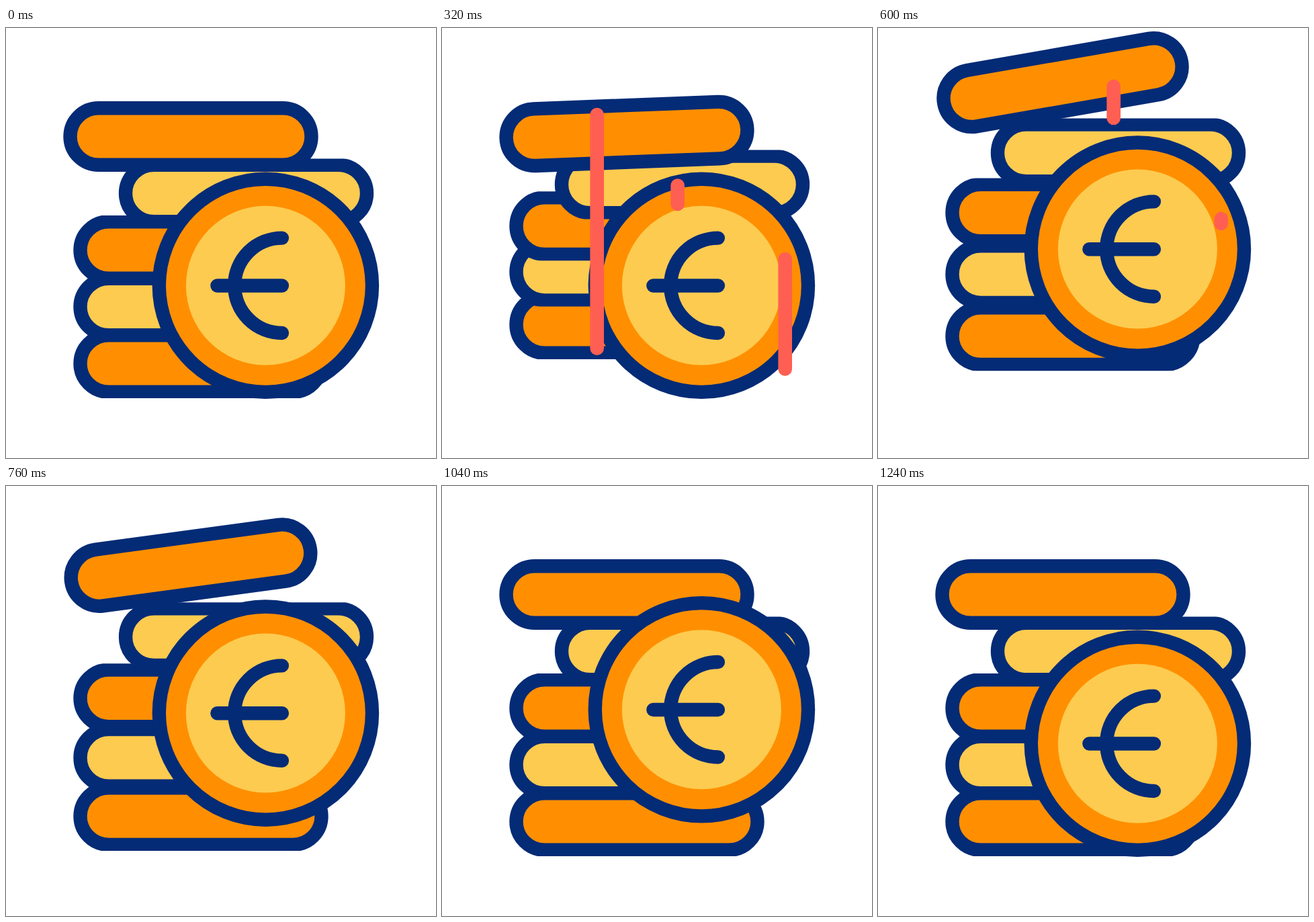
An HTML page that plays this animation: 640 by 640 pixels, repeating every 2 s.

```html
<!DOCTYPE html>
<html lang="en">
<head>
<meta charset="utf-8">
<title>Coin stack</title>
<style>
  html, body { margin: 0; width: 100%; height: 100%; overflow: hidden; background: #fff; }
  svg { display: block; width: 100vw; height: 100vh; }
  .line { fill: none; stroke: #042b76; stroke-width: 20.4; stroke-linecap: round; }
  .orange { fill: #ff8f00; }
  .yellow { fill: #fdcb50; }
  .streak { stroke: #ff5f52; stroke-width: 20.6; stroke-linecap: round; }
</style>
</head>
<body>
<svg viewBox="0 0 640 640">
  <defs>
    <clipPath id="trim"><rect x="-200" y="-51.5" width="400" height="103"/></clipPath>
  </defs>
  <g id="bars"></g>
  <g id="coin">
    <circle class="orange" r="158.6"/>
    <circle class="line" r="158.6"/>
    <circle class="yellow" r="118.5"/>
    <path class="line" d="M24.5-70.7A70.7 70.7 0 0 0 24.5 70.7M-72 .2H24.5"/>
  </g>
  <g id="streaks"></g>
</svg>
<script>
const LOOP = 2000, STEP = 40;
const $ = id => document.getElementById(id);

function add(parent, tag, attrs) {
  const el = document.createElementNS('http://www.w3.org/2000/svg', tag);
  for (const k in attrs) el.setAttribute(k, attrs[k]);
  return parent.appendChild(el);
}

// Cubic easing with handles (a, 0) and (b, 1)
function ease(a, b) {
  return x => {
    if (x <= 0) return 0;
    if (x >= 1) return 1;
    let lo = 0, hi = 1, s;
    for (let i = 0; i < 24; i++) {
      s = (lo + hi) / 2;
      const q = 1 - s;
      if (3 * q * q * s * a + 3 * q * s * s * b + s * s * s < x) lo = s; else hi = s;
    }
    return s * s * (3 - 2 * s);
  };
}
const rise = ease(.6, .31);
const fall = ease(.48, .56);
const linear = x => Math.min(1, Math.max(0, x));
const part = (t, from, to, fn) => fn((t - from) / (to - from));

// 0 -> 1 -> 0
const hop = (t, from, peak, to, up = rise, down = fall) =>
  part(t, from, peak, up) - part(t, peak, to, down);

// Bottom bar first, so that upper bars overlap lower ones
const bars = [
  { x: 290, y: 499.5, lift: 60.2, fill: 'orange' },
  { x: 290, y: 415, lift: 60.5, fill: 'yellow' },
  { x: 290, y: 330.5, lift: 60.5, fill: 'orange' },
  { x: 357.5, y: 246, lift: 60.5, fill: 'yellow' },
  { x: 275, y: 161.5, lift: 81, fill: 'orange', tilt: -11 }
];
bars.forEach((b, i) => {
  b.from = i * 60;
  b.peak = b.from + 400;
  b.el = add($('bars'), 'g', {});
  const box = add(b.el, 'g', b.tilt ? {} : { 'clip-path': 'url(#trim)' });
  const shape = { x: -179.5, y: -42.3, width: 359, height: 84.6, rx: 42.3 };
  add(box, 'rect', { ...shape, class: b.fill });
  add(box, 'rect', { ...shape, class: 'line' });
});

const streaks = [
  { x: 230.7, low: 493, high: 117.5, from: 60 },
  { x: 510.7, low: 507.5, high: 284, from: 140 },
  { x: 350.7, low: 262, high: 87, from: 220 }
];
streaks.forEach(s => s.el = add($('streaks'), 'line', { class: 'streak', x1: s.x, x2: s.x }));

function draw(t) {
  for (const b of bars) {
    const y = b.y - b.lift * hop(t, b.from, b.peak, 882);
    const turn = (b.tilt || 0) * hop(t, 240, 640, 1040, linear, linear);
    b.el.setAttribute('transform', `translate(${b.x} ${y}) rotate(${turn})`);
  }

  const jump = 58 * hop(t, 370, 680, 910) + 51.3 * hop(t, 910, 1060, 1240);
  $('coin').setAttribute('transform', `translate(386.4 ${383.3 - jump})`);

  for (const s of streaks) {
    const at = start => s.low + (s.high - s.low) * part(t, start, start + 320, rise);
    const head = at(s.from), tail = at(s.from + 200);
    s.el.setAttribute('y1', head);
    s.el.setAttribute('y2', tail);
    s.el.setAttribute('visibility', tail - head > .1 ? 'visible' : 'hidden');
  }
}

const start = performance.now();
function tick() {
  const t = (performance.now() - start) % LOOP;
  draw(Math.floor(t / STEP) * STEP);
  requestAnimationFrame(tick);
}
tick();
</script>
</body>
</html>
```
